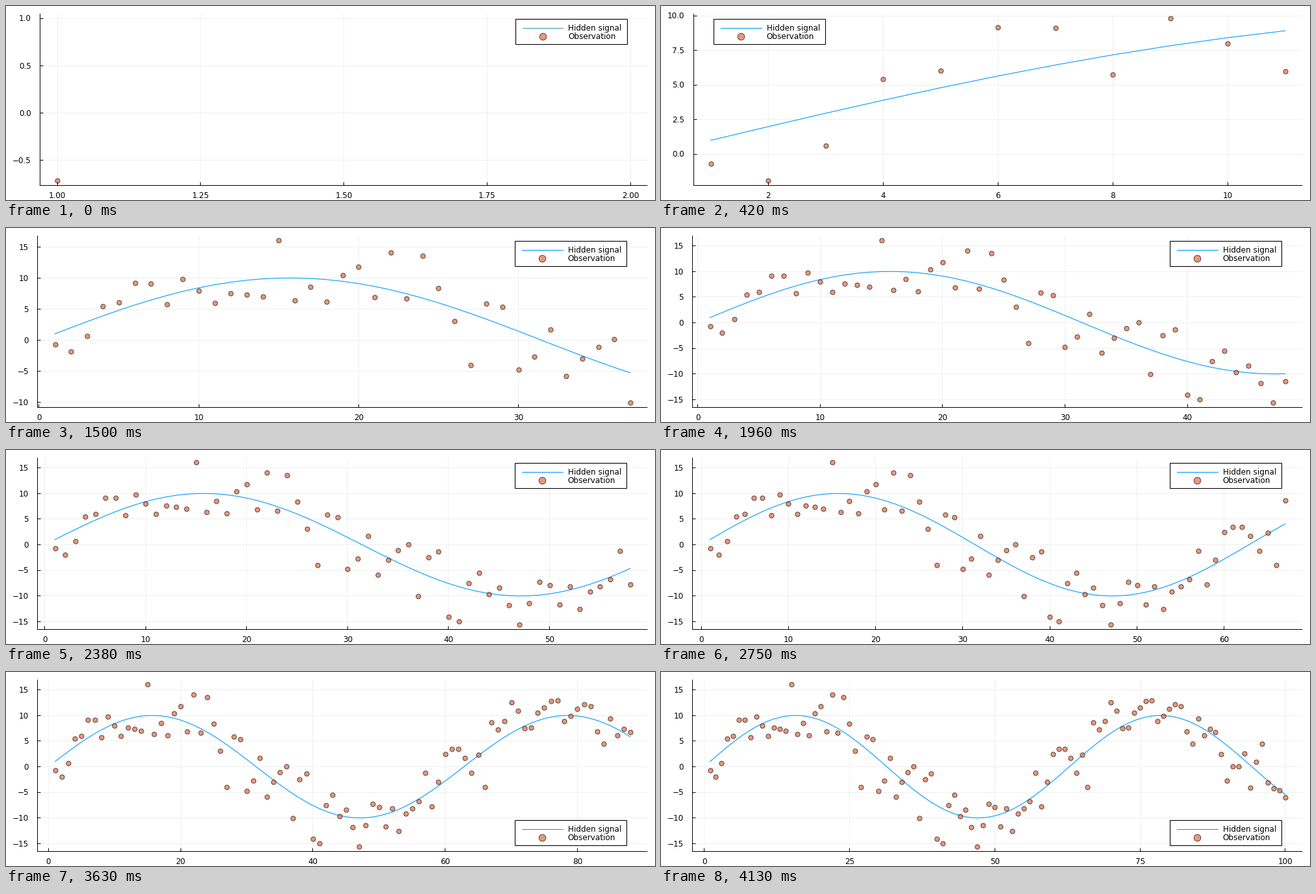
These frames come from a looping animation (1000x300 px, 4.18 s). A matplotlib script:

```python
import math

import numpy as np
import matplotlib.pyplot as plt
from matplotlib.animation import FuncAnimation
from matplotlib.collections import LineCollection
from matplotlib.patches import Rectangle

W, H, DPI = 1000, 300, 100
PX = 72 / DPI                      # points per pixel
EM = 12                            # font size in pixels
TOP, BOTTOM, RIGHT = 11.8, 277.2, 988.5
BLUE, TEAL = "#009afa", "#459db2"
FILL, EDGE = (0.886, 0.435, 0.275, 0.72), (0, 0, 0, 0.72)

OBS = np.array([
    -0.71, -1.90, 0.63, 5.44, 6.03, 9.16, 9.10, 5.75, 9.80, 7.98,
    6.00, 7.57, 7.34, 6.97, 16.04, 6.36, 8.54, 6.15, 10.45, 11.77,
    6.88, 14.04, 6.67, 13.53, 8.34, 3.07, -4.01, 5.83, 5.38, -4.77,
    -2.67, 1.69, -5.85, -3.03, -1.13, 0.10, -10.06, -2.50, -1.34, -14.10,
    -14.94, -7.54, -5.45, -9.64, -8.43, -11.77, -15.55, -11.43, -7.27, -7.88,
    -11.68, -8.15, -12.56, -9.11, -8.11, -6.76, -1.26, -7.80, -2.98, 2.41,
    3.51, 3.41, 1.75, -1.17, 2.37, -3.99, 8.60, 7.22, 8.83, 12.56,
    10.94, 7.54, 7.63, 10.57, 11.60, 12.78, 12.89, 8.93, 9.93, 11.24,
    12.22, 11.73, 6.81, 4.48, 9.40, 6.10, 7.40, 6.79, 2.51, -2.75,
    0.01, 0.00, 2.62, -4.08, 0.95, 4.42, -3.10, -4.18, -4.64, -5.94])
STEP = np.arange(1, len(OBS) + 1)
SIGNAL = 10 * np.sin(STEP / 10)

# One new point every 1/24 s, on a 10 ms clock.
TICK_MS, TICKS = 10, 418
STARTS = [int(k * 25 / 6 + 0.5) for k in range(len(OBS))]


def widen(lo, hi):
    pad = 0.03 * (hi - lo)
    return lo - pad, hi + pad


def nice_ticks(lo, hi):
    """Pick 4 to 8 ticks by granularity, zero, coverage and roundness."""
    span, best, pick = hi - lo, -1e9, []
    top = math.ceil(math.log10(span))
    for z in range(top, top - 3, -1):
        for k in range(4, 17):
            for q, nice in ((1, 1), (5, .9), (2, .7), (2.5, .5), (3, .2)):
                step = q * 10.0 ** z
                reach = (k - 1) * step
                if not span <= reach < 2 * span:
                    continue
                r = math.ceil((hi - reach) / step)
                while r * step <= lo:
                    s = [(r + i) * step for i in range(k)
                         if lo <= (r + i) * step <= hi]
                    if 4 <= len(s) <= 8:
                        zero = r <= 0 and -r < k
                        score = ((1 - abs(len(s) - 5) / 5) / 4 + zero / 6
                                 + 0.5 * span / ((len(s) - 1) * step)
                                 + nice / 4)
                        if score > best + 1e-9:
                            best, pick = score, s
                    r += 1
    return pick


def tick_labels(ticks):
    places = next(d for d in range(6)
                  if all(abs(round(t, d) - t) < 1e-9 for t in ticks))
    return [f"{t + 0.0:.{places}f}".replace("-", "\u2212") for t in ticks]


def text_width(s):
    return EM * sum({".": 0.318, "\u2212": 0.838}.get(c, 0.636) for c in s)


def legend_corner(n, xl, yl):
    """Emptiest corner; ties go to the top, then to the right."""
    u = np.tile((STEP[:n] - xl[0]) / (xl[1] - xl[0]), 2)
    v = (np.r_[SIGNAL[:n], OBS[:n]] - yl[0]) / (yl[1] - yl[0])
    sides = {"right": u >= 0.75, "left": u <= 0.25}
    rows = {"top": v >= 0.75, "bottom": v <= 0.25}
    corners = [(r, s) for r in rows for s in sides]
    return min(corners, key=lambda c: np.sum(rows[c[0]] & sides[c[1]]))


def crisp(v):
    return math.floor(v) + 0.5


fig = plt.figure(figsize=(W / DPI, H / DPI), dpi=DPI, facecolor="white")
ax = fig.add_axes([0, 0, 1, 1])
ax.set(xlim=(0, W), ylim=(H, 0))
ax.axis("off")


def lines(color, z):
    return ax.add_collection(LineCollection(
        [], colors=color, linewidths=PX, zorder=z, snap=False), autolim=False)


def curve(z):
    return ax.plot([], [], color=BLUE, lw=1.1 * PX, zorder=z)[0]


def dots(size, z):
    return ax.plot([], [], "o", ms=size * PX, mfc=FILL, mec=EDGE,
                   mew=0.9 * PX, zorder=z)[0]


def label(ha, z=4, text=""):
    return ax.text(0, 0, text, ha=ha, va="baseline", size=EM * PX,
                   family="DejaVu Sans", zorder=z)


grid, frame = lines("#efefef", 1), lines("black", 4)
signal, points = curve(2), dots(7.2, 3)
box = ax.add_patch(Rectangle((0, 0), 1, 39, fc="white", ec="black",
                             lw=1.1 * PX, zorder=5, snap=False))
key_line, key_dot = curve(6), dots(10.6, 6)
names = [label("left", 6, s) for s in ("Hidden signal", "Observation")]
x_text = [label("center") for _ in range(8)]
y_text = [label("right") for _ in range(8)]


def place_labels(pool, texts, spots):
    for t in pool:
        t.set_text("")
    for t, s, spot in zip(pool, texts, spots):
        t.set_text(s)
        t.set_position(spot)


def place_legend(row, side, left):
    unit = (RIGHT - left) / 45
    width = 4.5 * unit + 78.5
    x = left + 1.5 * unit if side == "left" else RIGHT - 1.5 * unit - width
    y = 20.5 if row == "top" else 229.5
    box.set_xy((crisp(x), y))
    box.set_width(round(width))
    a, b = x + 0.5 * unit, x + 3.5 * unit
    key_line.set_data([a, b], [y + 13.2] * 2)
    key_dot.set_data([(a + b) / 2], [y + 26.2])
    for i, t in enumerate(names):
        t.set_position((x + 4 * unit - 2.4, y + 17.6 + 13 * i))


def draw(i):
    n = int(np.searchsorted(STARTS, i, side="right"))
    values = np.r_[SIGNAL[:n], OBS[:n]]
    xl, yl = widen(1, max(n, 2)), widen(values.min(), values.max())
    xt, yt = nice_ticks(*xl), nice_ticks(*yl)
    xs, ys = tick_labels(xt), tick_labels(yt)
    left = 23.6 + max(map(text_width, ys))

    def px(x):
        return left + (x - xl[0]) / (xl[1] - xl[0]) * (RIGHT - left)

    def py(y):
        return BOTTOM - (y - yl[0]) / (yl[1] - yl[0]) * (BOTTOM - TOP)

    gx, gy = [px(t) for t in xt], [py(t) for t in yt]
    x0, y0 = crisp(left), crisp(BOTTOM)
    grid.set_segments([[(crisp(x), TOP), (crisp(x), y0)] for x in gx]
                      + [[(x0, crisp(y)), (RIGHT, crisp(y))] for y in gy])
    frame.set_segments([[(x0, TOP), (x0, y0 + 0.5)], [(x0, y0), (RIGHT, y0)]]
                       + [[(crisp(x), y0), (crisp(x), y0 - 5)] for x in gx]
                       + [[(x0, crisp(y)), (x0 + 5, crisp(y))] for y in gy])
    place_labels(x_text, xs, [(x, 296.8) for x in gx])
    place_labels(y_text, ys, [(left - 14.1, y + 4.4) for y in gy])

    signal.set_data(px(STEP[:n]), py(SIGNAL[:n]))
    points.set_data(px(STEP[:n]), py(OBS[:n]))
    place_legend(*legend_corner(n, xl, yl), left)
    key_line.set_color(TEAL if n == 1 else BLUE)
    return []


anim = FuncAnimation(fig, draw, frames=TICKS, interval=TICK_MS,
                     repeat=True, repeat_delay=0, cache_frame_data=False)
plt.show()
```
